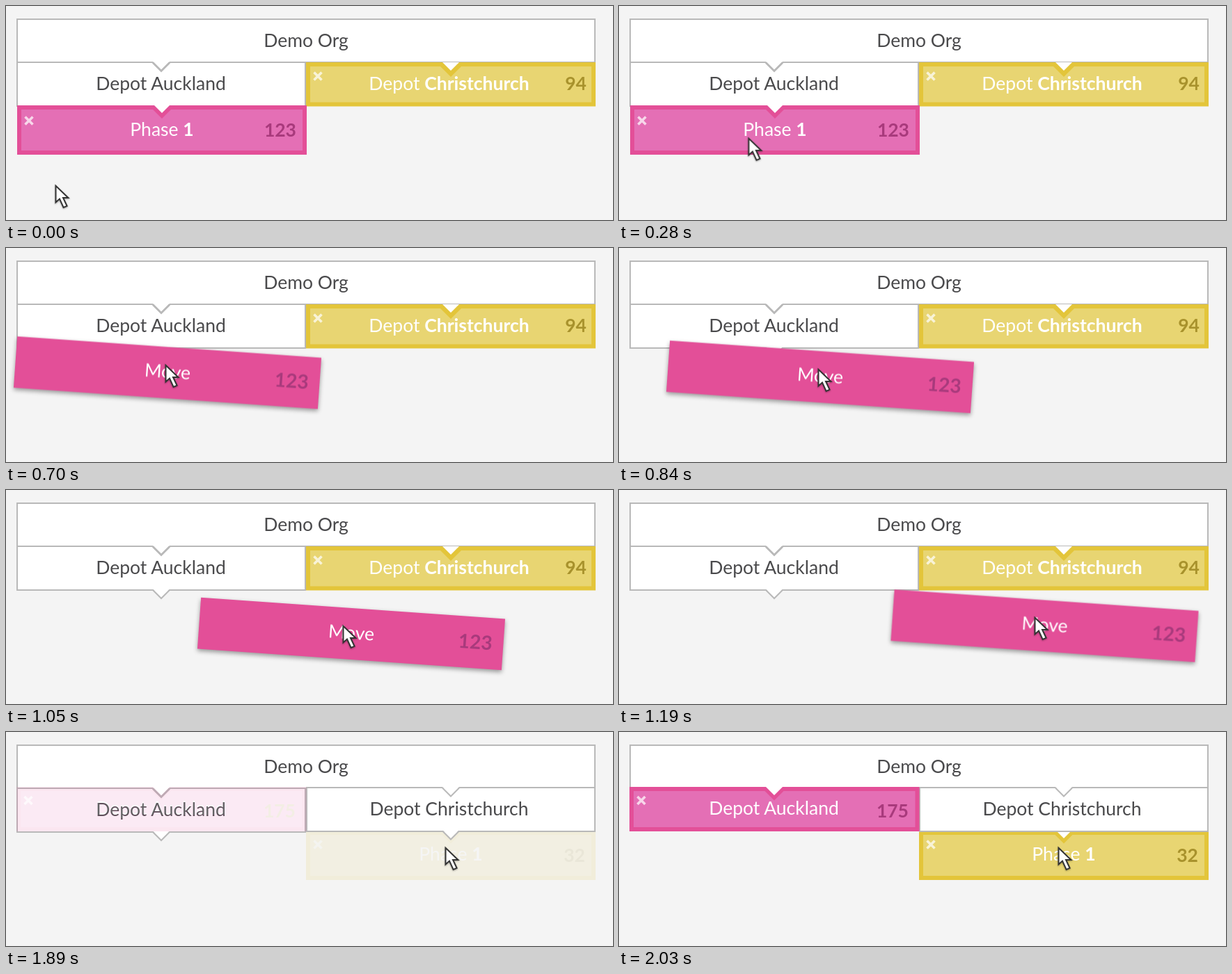
Recreate the animation shown at these times as an HTML page. Size 872 by 308 pixels, loop 3080 ms.

```html
<!DOCTYPE html>
<html lang="en">
<head>
<meta charset="utf-8">
<title>Move a group</title>
<style>
  html, body { margin: 0; width: 100%; height: 100%; overflow: hidden; background: #f4f4f4; }
  svg { display: block; width: 100%; height: 100%; }
  text { font: 26.5px Lato, "Open Sans", sans-serif; fill: #4a4a4c; text-anchor: middle; white-space: pre; }
  .num { font-weight: 700; text-anchor: end; }
  .bold { font-weight: 700; }
  .white { fill: #fff; }
  #card { filter: drop-shadow(0 3px 3px rgba(0, 0, 0, .38)); }
  #cursor path { filter: drop-shadow(0 1px 1px rgba(0, 0, 0, .35)); }
</style>
</head>
<body>
<svg id="stage" viewBox="0 0 872 308" preserveAspectRatio="none"></svg>
<script>
const LOOP = 3080, TICK = 70;
const GREY = '#b9b9b9';
const PINK = { edge: '#e34f98', fill: '#e46fb5', ink: '#a83a7c' };
const GOLD = { edge: '#e3c53a', fill: '#e8d572', ink: '#a8922c' };

const group = (id, ...parts) => `<g id="${id}">${parts.join('')}</g>`;
const text = (x, y, s, cls = '') => `<text x="${x}" y="${y}" class="${cls}">${s}</text>`;
const num = (x, y, s, ink) => `<text x="${x}" y="${y}" class="num" style="fill:${ink}">${s}</text>`;
const rect = (x1, y1, x2, y2, w, edge, fill) =>
  `<rect x="${x1 + w / 2}" y="${y1 + w / 2}" width="${x2 - x1 - w}" height="${y2 - y1 - w}"
    fill="${fill}" stroke="${edge}" stroke-width="${w}"/>`;
const tri = (x, y, h, fill) => `<path d="M${x - h} ${y}h${2 * h}l${-h} ${h}z" fill="${fill}"/>`;
const cross = (x, y) =>
  `<path d="M${x - 5.5} ${y - 5.5}l11 11m0-11l-11 11" stroke="#fff" stroke-width="3.6" opacity=".72"/>`;

// Pointer of a white box, outlined in grey
const notch = (x, y, w = 2) =>
  tri(x, y - 1.5, 12, '#fff') +
  `<path d="M${x - 12} ${y}l12 12l12-12" fill="none" stroke="${GREY}" stroke-width="${w}"/>`;

// Pointer reaching into a coloured box
const inset = (x, y, h, tip, c) => tri(x, y, tip, c.edge) + tri(x, y, h, '#fff');

document.getElementById('stage').innerHTML = [
  rect(15, 18, 847, 82, 2, GREY, '#fff'),
  text(431, 59, 'Demo Org'),

  group('leftPlain',
    rect(15, 80, 431, 145, 2, GREY, '#fff'),
    notch(223, 81.5, 3), notch(223, 144),
    text(222.5, 121, 'Depot Auckland')),

  group('goldOld',
    rect(431, 81, 847, 144.5, 6, GOLD.edge, GOLD.fill),
    inset(639, 81, 12, 21, GOLD), cross(448, 101),
    text(636.5, 121, 'Depot <tspan class="bold">Christchurch</tspan>', 'white'),
    num(834, 121, '94', GOLD.ink)),

  group('pinkOld',
    rect(16, 143, 432, 214, 6, PINK.edge, PINK.fill),
    inset(224, 143, 11, 19, PINK), cross(33, 165),
    text(224, 187, 'Phase <tspan class="bold">1</tspan>', 'white'),
    num(417, 188, '123', PINK.ink)),

  group('goldNew',
    rect(431, 142, 847, 213, 6, GOLD.edge, GOLD.fill),
    inset(639, 142, 11, 18.5, GOLD), cross(448, 162),
    text(639, 185, 'Phase <tspan class="bold">1</tspan>', 'white'),
    num(832, 187, '32', GOLD.ink)),

  group('rightPlain',
    rect(431, 79, 847, 144, 2, GREY, '#fff'),
    notch(639, 80.5),
    text(636.5, 120, 'Depot Christchurch')),

  group('rightTip', notch(639, 142.5)),

  group('pinkNew',
    rect(15, 79, 431.5, 143, 6, PINK.edge, PINK.fill),
    inset(223, 79, 12, 19.5, PINK),
    text(222.5, 119, 'Depot Auckland', 'white')),
  group('pinkInfo', cross(32, 98.5), num(416, 123, '175', 'inherit')),

  group('drag', group('card',
    `<g transform="rotate(4.05)">
      <rect x="-219" y="-37" width="438" height="74" fill="${PINK.edge}"/>
      ${text(0, 7.5, 'Move', 'white')}
      <text x="203" y="9" class="num" style="fill:${PINK.ink};font-size:28px">123</text>
    </g>`)),

  group('cursor',
    `<path d="M.5 .8V24.5L6 19.6L11.6 32L16.6 29.8L11 18H18.4z"
      fill="#fff" stroke="#333" stroke-width="2"/>`)
].join('');

// steps: [time, value] pairs, each held until the next
function play(el, prop, steps) {
  const keys = steps.map(([t, v]) => ({ offset: t / LOOP, [prop]: v, easing: 'step-end' }));
  keys.push({ offset: 1, [prop]: steps[steps.length - 1][1] });
  el.animate(keys, { duration: LOOP, iterations: Infinity });
}
const $ = id => document.getElementById(id);
const show = (id, from, to = LOOP) =>
  play($(id), 'opacity', [[0, from ? 0 : 1], ...(from ? [[from, 1]] : []), ...(to < LOOP ? [[to, 0]] : [])]);
const fadeIn = id => play($(id), 'opacity', [[0, 0], [1890, .14], [1960, .57], [2030, 1]]);
const at = (x, y) => `translate(${x}px, ${y}px)`;

show('leftPlain', 0, 2030);
show('goldOld', 0, 1890);
show('pinkOld', 0, 700);
show('drag', 700, 1890);
show('rightPlain', 1890);
show('rightTip', 1890, 2030);
show('pinkInfo', 1890);
fadeIn('pinkNew');
fadeIn('goldNew');
play($('pinkInfo').querySelector('text'), 'fill',
  [[0, '#f3eee4'], [1890, '#f3eee4'], [1960, '#cc92b0'], [2030, PINK.ink]]);

// Approach, then drag: [cursor x, cursor y, card offset x, card offset y]
const approach = [];
for (let i = 0; i <= 6; i++) {
  const u = i / 6, e = u * u * (3 - 2 * u);
  approach.push([i * TICK, at(71 + 155 * e, 258 - 92 * e)]);
}
const path = [
  [229, 168, 3, 11.5], [250, 170, 3, 11.5], [286, 174, 3, 11.5], [344, 182, 6, 12], [414, 190, 9, 12],
  [484, 195, 12, 12], [548, 191, 14, 12], [597, 183, 14.5, 12.5], [620, 174, 15, 11], [631, 166, 15, 9.5]
];
const hops = fn => path.map((p, i) => [700 + i * TICK, fn(...p)]);

play($('cursor'), 'transform', [...approach, [560, at(227, 167)], ...hops((x, y) => at(x, y))]);
play($('drag'), 'transform', [[0, at(232, 179)], ...hops((x, y, dx, dy) => at(x + dx, y + dy))]);
</script>
</body>
</html>
```
